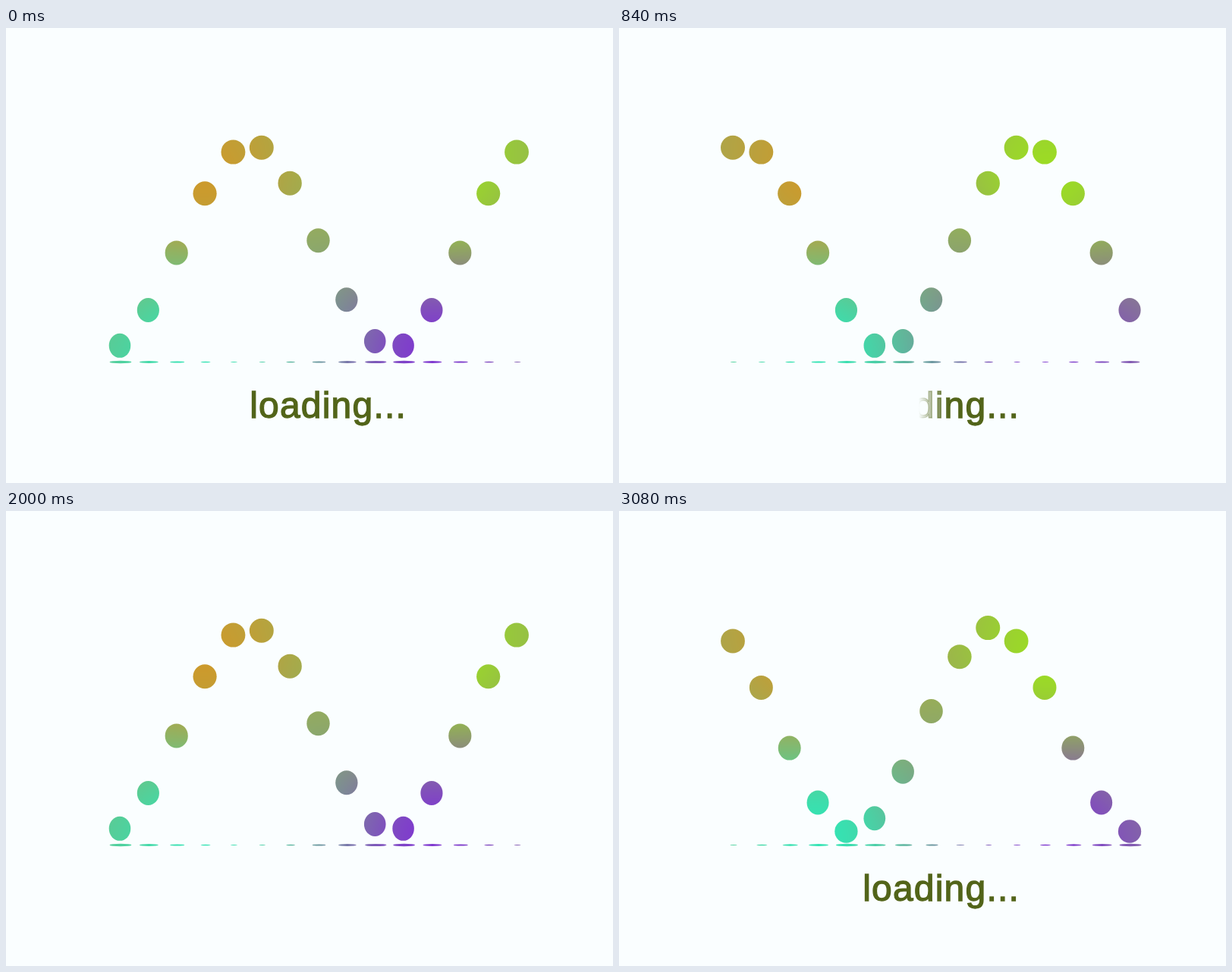
Write an HTML page with a canvas that moves like this. It is 800 px wide and 600 px high and loops after 3120 ms.

```html
<!DOCTYPE html>
<html lang="en">
<head>
<meta charset="utf-8">
<title>Loading</title>
<style>
  html, body { margin: 0; width: 100%; height: 100%; overflow: hidden; background: #fafeff; }
  canvas, svg { position: absolute; left: 0; top: 0; width: 800px; height: 600px; }
  text { font: 48px "Liberation Sans", Arial, sans-serif; letter-spacing: 1.2px; }
</style>
</head>
<body>
<canvas id="stage" width="800" height="600"></canvas>
<svg viewBox="0 0 800 600">
  <linearGradient id="wipe" gradientUnits="userSpaceOnUse" y1="0" y2="0">
    <stop offset="0" stop-color="#526419" stop-opacity="0"/>
    <stop offset="1" stop-color="#526419"/>
  </linearGradient>
  <text x="321.2" y="514.4" fill="url(#wipe)" stroke="url(#wipe)" stroke-width="1.3">loading...</text>
</svg>
<script>
const W = 800, H = 600, LOOP = 3120, STEP = 40;
const BALLS = 15, FIRST_X = 150, GAP = 37.36;
const MID_Y = 288.3, SWING = 135.5;
const ctx = document.getElementById('stage').getContext('2d');
const wipe = document.getElementById('wipe');

// Four colour points blended by inverse squared distance.
const POINTS = [
  { x: 260, y: 194, rgb: [204, 154, 44] },
  { x: 565, y: 194, rgb: [156, 220, 36] },
  { x: 260, y: 427, rgb: [51, 228, 180] },
  { x: 565, y: 427, rgb: [127, 56, 208] }
];

function makeField() {
  const field = document.createElement('canvas');
  field.width = W;
  field.height = H;
  const fieldCtx = field.getContext('2d');
  const image = fieldCtx.createImageData(W, H);
  for (let y = 0, k = 0; y < H; y++) {
    for (let x = 0; x < W; x++, k += 4) {
      let total = 0, r = 0, g = 0, b = 0;
      for (const p of POINTS) {
        const weight = 1 / ((x - p.x) ** 2 + (y - p.y) ** 2 + 1);
        total += weight;
        r += weight * p.rgb[0];
        g += weight * p.rgb[1];
        b += weight * p.rgb[2];
      }
      image.data[k] = r / total;
      image.data[k + 1] = g / total;
      image.data[k + 2] = b / total;
      image.data[k + 3] = 255;
    }
  }
  fieldCtx.putImageData(image, 0, 0);
  return field;
}

const field = makeField();

function ellipse(x, y, w, h) {
  ctx.beginPath();
  ctx.ellipse(x, y, w / 2, h / 2, 0, 0, 2 * Math.PI);
  ctx.fill();
}

function drawBall(i, t) {
  const phase = ((80 + t + 200 * i) / 1000) % 2;
  const lift = phase < 1 ? phase : 2 - phase; // 0 on the floor, 1 at the top
  const eased = lift * lift * (3 - 2 * lift);
  const drop = SWING * (1 - 2 * eased);
  const squash = Math.max(0, 1 - lift / 0.08);
  const x = FIRST_X + GAP * i;
  ellipse(x, MID_Y + drop, 28.5 + 3.5 * eased + 3.6 * squash, 32 - 3.2 * squash);
  const shadow = 18.4 + 0.079 * drop;
  ellipse(x + 1, 440.5, shadow, shadow * 0.115);
}

function render(t) {
  ctx.globalCompositeOperation = 'source-over';
  ctx.clearRect(0, 0, W, H);
  for (let i = 0; i < BALLS; i++) drawBall(i, t);
  ctx.globalCompositeOperation = 'source-in';
  ctx.drawImage(field, 0, 0);

  // The wipe runs right for half the loop, then back.
  const edge = 415 + (Math.min(t, LOOP - t) - 840) * W / (LOOP / 2);
  wipe.setAttribute('x1', edge - 20);
  wipe.setAttribute('x2', edge + 20);
}

const start = performance.now();
function tick() {
  const t = (performance.now() - start) % LOOP;
  render(Math.floor(t / STEP) * STEP);
  requestAnimationFrame(tick);
}
tick();
</script>
</body>
</html>
```
